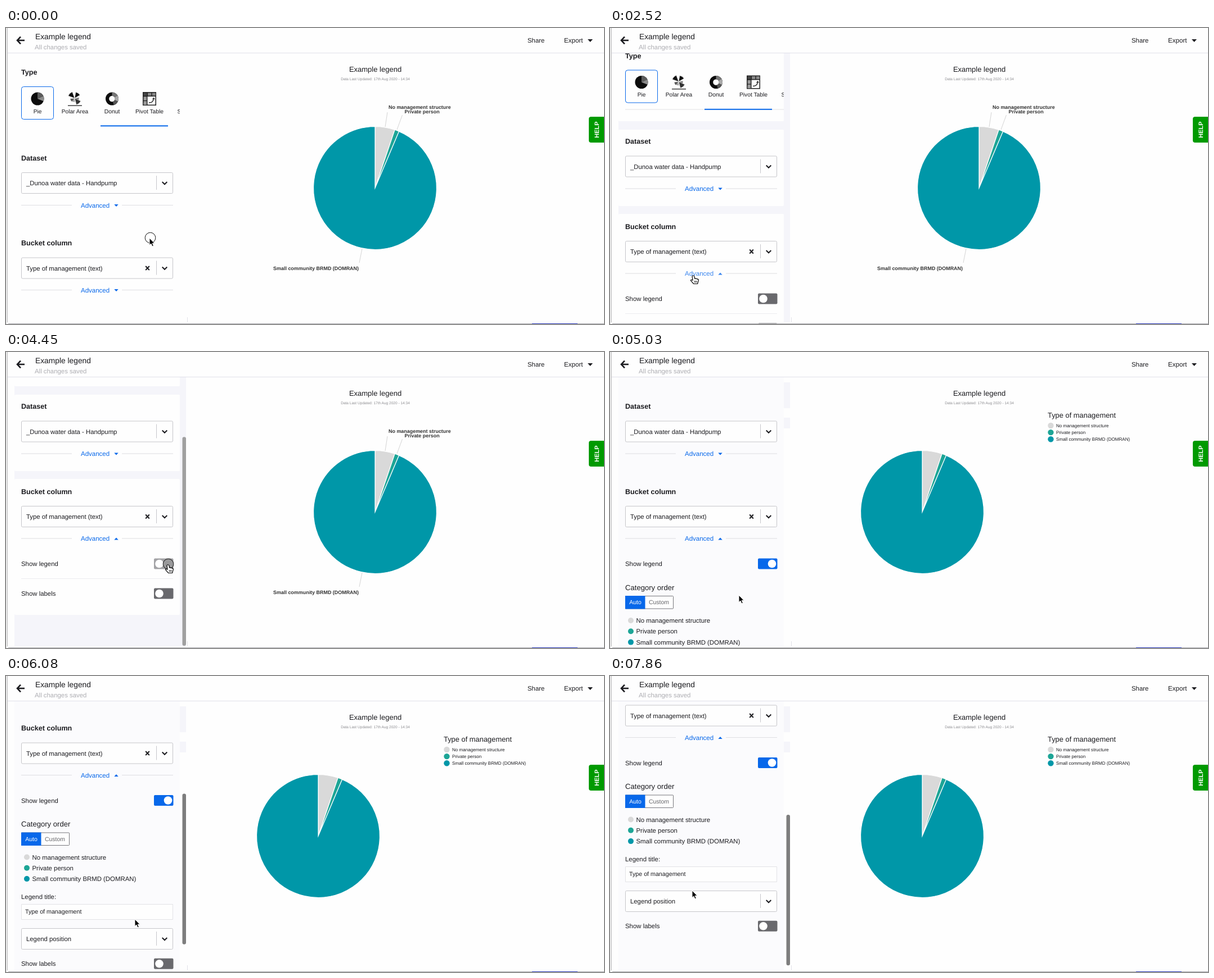
These frames come from a looping animation (1063x527 px, 8 s). An HTML page with a canvas:

```html
<!DOCTYPE html>
<html lang="en">
<head>
<meta charset="utf-8">
<title>Chart legend settings</title>
<style>
html, body { margin: 0; width: 100%; height: 100%; overflow: hidden; background: #fefefe; }
canvas { display: block; width: 1063px; height: 527px; }
</style>
</head>
<body>
<canvas id="stage" width="1063" height="527"></canvas>
<script>
const ctx = document.getElementById('stage').getContext('2d');
const LOOP = 8000;
const WHITE = '#fefefe', INK = '#1c1c20', BLUE = '#0868ea', GAP = '#f5f5fa';
const CATEGORIES = [
  ['No management structure', '#d9d9d9'],
  ['Private person', '#1da596'],
  ['Small community BRMD (DOMRAN)', '#0097a8']
];

// Moments when the state changes at once.
const RELEASE = 150, BAR_ON = 590, REPAINT = 1340, EXPAND = 2520, LEGEND = 4590, SAVED = 4890;

// Each segment: start, end, number of steps, from, to, ease-out power.
const SCROLL = [
  [590, 740, 2, [0], [29.5], 1.5],
  [2960, 3260, 3, [29.5], [134.5], 1.5],
  [5480, 6080, 5, [134.5], [290], 1.37],
  [6520, 7110, 5, [290], [357], 3.6]
];
const POINTER = [
  [1340, 2370, 8, [255, 374], [148, 441], 7],
  [3560, 4300, 6, [148, 441], [288, 379], 1.6],
  [4740, 5030, 3, [288, 379], [229, 433], 1.5],
  [6820, 7110, 3, [229, 433], [128, 308], 1.3],
  [7560, 7860, 3, [128, 308], [146, 382], 1.3]
];

function track(segs, t) {
  let value = segs[0][3];
  for (const [start, end, n, from, to, power] of segs) {
    if (t < start) break;
    const step = Math.floor((t - start + 8) / ((end - start) / (n - 1))) + 1;
    const k = 1 - Math.pow(1 - Math.min(step / n, 1), power);
    value = from.map((v, i) => v + (to[i] - v) * k);
  }
  return value;
}

const within = (t, a, b) => t >= a && t < b;

// y is the middle of the capitals
function text(str, x, y, size = 11.4, color = INK, align = 'left', weight = '') {
  ctx.font = `${weight} ${size}px "Liberation Sans", Arial, sans-serif`;
  ctx.textAlign = align;
  ctx.fillStyle = color;
  ctx.fillText(str, x, y + size * 0.36);
}

function rect(x, y, w, h, color) {
  ctx.fillStyle = color;
  ctx.fillRect(x, y, w, h);
}

function round(x, y, w, h, r, fill, stroke) {
  ctx.beginPath();
  ctx.roundRect(x, y, w, h, r);
  paint(fill, stroke, 1);
}

function paint(fill, stroke, width) {
  if (fill) { ctx.fillStyle = fill; ctx.fill(); }
  if (stroke) { ctx.strokeStyle = stroke; ctx.lineWidth = width; ctx.stroke(); }
}

function dot(x, y, r, fill, stroke, width = 1) {
  ctx.beginPath();
  ctx.arc(x, y, r, 0, 7);
  paint(fill, stroke, width);
}

function poly(points, x, y, fill, stroke, width = 1, closed = true) {
  ctx.beginPath();
  for (const [dx, dy] of points) ctx.lineTo(x + dx, y + dy);
  if (closed) ctx.closePath();
  paint(fill, stroke, width);
}

const line = (points, x, y, color, width) => poly(points, x, y, null, color, width, false);

// Angles in degrees, clockwise from the top.
function wedge(x, y, r, a, b, fill, stroke, width = 1) {
  const rad = d => (d - 90) * Math.PI / 180;
  ctx.beginPath();
  ctx.moveTo(x, y);
  ctx.arc(x, y, r, rad(a), rad(b));
  ctx.closePath();
  paint(fill, stroke, width);
}

function header(t) {
  rect(3, 0, 1060, 44, WHITE);
  rect(3, 44, 1060, 1, '#e0e0ea');
  line([[7, 0], [-5, 0]], 26, 22, INK, 2.6);
  line([[0, -6.3], [-6, 0], [0, 6.3]], 26, 22, INK, 2.6);
  const saving = within(t, LEGEND, SAVED);
  text('Example legend', 52, saving ? 22 : 15, 13.8);
  if (!saving) text('All changes saved', 51, 34, 11.4, '#adadb2');
  text('Share', 927, 22);
  text('Export', 992, 22, 11.6);
  poly([[-4.5, -2], [4.5, -2], [0, 3]], 1038.5, 22, INK);
}

function frameEdges() {
  rect(0, 0, 2, 527, '#ececec');
  rect(2, 0, 1, 524, '#bdbdc0');
  rect(322, 515, 1, 9, '#e2e2e8');
  rect(4, 526, 1059, 1, '#a8a8ac');
  rect(935, 526, 81, 1, '#2030b0');
}

function help() {
  round(1036, 158, 32, 46, 4, '#009a00');
  ctx.save();
  ctx.translate(1050, 181);
  ctx.rotate(-Math.PI / 2);
  text('HELP', 0, 0, 11, '#fff', 'center', 'bold');
  ctx.restore();
}

function chart(t) {
  const legend = t >= LEGEND;
  const x = legend ? 555 : 656, y = 285;
  text('Example legend', 656.5, 73, 13, INK, 'center');
  text('Data Last Updated: 17th Aug 2020 - 14:34', 656.5, 91, 6.55, '#8c8c90', 'center');
  const edges = [0, 18.7, 22.9, 360];
  CATEGORIES.forEach(([, color], i) => wedge(x, y, 109.5, edges[i], edges[i + 1], color, '#fff', 1.2));
  if (legend) {
    text('Type of management', 778, 112, 12.9);
    CATEGORIES.forEach(([name, color], i) => {
      dot(783.5, 131 + i * 12.1, 5.2, color);
      text(name, 793, 131 + i * 12.1, 8.1);
    });
    return;
  }
  line([[674, 176], [678, 150]], 0, 0, '#d4d4d4');
  line([[695, 181], [704.5, 155]], 0, 0, '#d4d4d4');
  line([[633, 393], [628, 418]], 0, 0, '#d4d4d4');
  const label = (i, px, py, align) => text(CATEGORIES[i][0], px, py, 8.95, '#333', align, 'bold');
  label(0, 680, 140.5);
  label(1, 708.5, 148.5);
  label(2, 627, 427.5, 'right');
}

function chartTypes(t) {
  ctx.save();
  ctx.beginPath();
  ctx.rect(15, 45, 294, 300);
  ctx.translate(0, 0);
  ctx.restore();

  round(27.5, 104.5, 57, 58, 4, null, BLUE);
  dot(56, 126, 11.5, '#0c0c0c');
  wedge(56, 126, 11.5, 0, 65, '#5c5c5c');
  wedge(56, 126, 11.5, 65, 112, '#8b8b8b');

  [[10, 11, '#111'], [80, 8, '#777'], [115, 12, '#333'], [175, 7, '#999'], [215, 8, '#555'], [290, 12, '#111']]
    .forEach(([a, r, c]) => wedge(122, 125, r, a, a + 50, c, '#fff', 0.6));
  rect(110, 137.5, 25, 1.3, '#222');

  dot(188.5, 126, 8.4, null, '#0c0c0c', 6.2);
  [[0, 60, '#777'], [60, 115, '#aaa'], [115, 165, '#555']].forEach(([a, b, c]) => {
    ctx.beginPath();
    ctx.arc(188.5, 126, 8.4, (a - 90) * Math.PI / 180, (b - 90) * Math.PI / 180);
    paint(null, c, 6.2);
  });

  rect(243, 114, 24, 24, '#222');
  for (let i = 0; i < 3; i++) {
    rect(244.5 + i * 7.6, 115.5, 6.2, 5, i ? '#888' : '#444');
    if (i) rect(244.5, 114.5 + i * 7.8, 5.5, 6.6, '#999');
  }
  rect(244.5, 133.5, 5.5, 3, '#999');
  rect(251.5, 122, 14, 14.5, '#fff');
  ctx.beginPath();
  ctx.moveTo(254, 133);
  ctx.quadraticCurveTo(262, 133, 262.5, 125.5);
  paint(null, '#222', 1.4);
  line([[-2, 2], [0, -0.5], [2, 2]], 262.5, 125, '#222', 1.2);

  text('Pie', 56, 148, 10.2, INK, 'center');
  text('Polar Area', 122.5, 148, 10.2, INK, 'center');
  text('Donut', 188.5, 148, 10.4, INK, 'center');
  text('Pivot Table', 255, 148, 10.3, INK, 'center');
  ctx.save();
  ctx.beginPath();
  ctx.rect(300, 100, 9, 80);
  ctx.clip();
  text('Scatter', 304.5, 148, 10.2);
  ctx.restore();
  if (t >= BAR_ON) rect(27, 174, 282, 1, '#e2e2e6');
  rect(168, 173.3, 120, 2, BLUE);
}

function select(label, y, clearable) {
  round(27.5, y - 18.5, 269, 37, 2, WHITE, '#c6c6ca');
  text(label, 36, y, 11.35);
  rect(267, y - 13, 1, 25, '#c6c6ca');
  line([[-4.3, -2], [0, 2.3], [4.3, -2]], 282, y, INK, 2);
  if (clearable) {
    line([[-3.3, -3.5], [3.3, 3.5]], 251.5, y, INK, 2);
    line([[3.3, -3.5], [-3.3, 3.5]], 251.5, y, INK, 2);
  }
}

function advanced(y, open, color = BLUE) {
  rect(27, y - 0.5, 90, 1, '#dedee2');
  rect(206, y - 0.5, 91, 1, '#dedee2');
  text('Advanced', 133, y, 11.5, color);
  const d = open ? -1 : 1;
  poly([[-3.7, -2 * d], [3.7, -2 * d], [0, 2 * d]], 196, y + 0.5, color);
}

function toggle(label, y, on, color) {
  text(label, 27, y);
  round(263, y - 9.5, 34.5, 19, 2, color || (on ? BLUE : '#69696d'));
  dot(on ? 288 : 272.5, y, 7.3, '#fff');
}

function legendOptions() {
  text('Category order', 27, 553.5, 13.1);
  round(27.5, 569, 85, 22.5, 1, WHITE, '#77777c');
  rect(27, 568.5, 35.5, 23.5, BLUE);
  text('Auto', 45, 580, 10.5, '#fff', 'center');
  text('Custom', 87, 580, 10.5, '#66666a', 'center');
  CATEGORIES.forEach(([name, color], i) => {
    dot(37, 612.5 + i * 19.3, 5, color);
    text(name, 46.5, 612.5 + i * 19.3);
  });
  text('Legend title:', 27, 682.5);
  round(27.5, 696.5, 269, 27, 0, WHITE, '#e2e2e6');
  text('Type of management', 34, 709.5, 10.7);
  select('Legend position', 758);
}

function backdrop(t, scroll) {
  if (t < REPAINT) return;
  if (t >= LEGEND) {
    rect(15, 45, 294, 479, '#fbfbfd');
    rect(309, 54, 11, 46, GAP);
    rect(309, 117, 11, 19, GAP);
    return;
  }
  rect(15, 45, 305, 479, GAP);
  const end = t >= EXPAND ? 602.5 : 497.5;
  for (const [top, bottom] of [[0, 195.5], [210.5, 346.5], [360.5, end]])
    round(15, top - scroll, 294, bottom - top, 2, WHITE);
}

function scrollbar(t, scroll) {
  if (!within(t, BAR_ON, 1490) && !within(t, 2960, LEGEND) && t < 5480) return;
  const height = t >= LEGEND ? 850 : t >= EXPAND ? 613.5 : 508.5;
  const color = t >= LEGEND ? '#7e7e7e' : t >= EXPAND ? '#a0a0a0' : '#b2b2b2';
  round(313.5, 47 + scroll * 476 / height, 6.5, 476 * 479 / height, 3.2, color);
}

function panel(t, scroll) {
  ctx.save();
  ctx.beginPath();
  ctx.rect(4, 45, 318, 481);
  ctx.clip();
  backdrop(t, scroll);
  ctx.translate(0, -scroll);
  const title = (str, y) => text(str, 27, y, 12.6, INK, 'left', 'bold');
  title('Type', 78.5);
  chartTypes(t);
  title('Dataset', 231);
  select('_Dunoa water data - Handpump', 276);
  advanced(315.5, false);
  title('Bucket column', 382.5);
  select('Type of management (text)', 427.5, true);
  const open = t >= EXPAND, legend = t >= LEGEND;
  advanced(466.5, open, within(t, 1930, 2960) ? '#3b86ee' : BLUE);
  if (open) {
    toggle('Show legend', 511.5, legend, within(t, 4440, LEGEND) && '#a3a3a6');
    if (legend) legendOptions();
    else rect(27, 537.5, 270, 1, '#ececf0');
    toggle('Show labels', legend ? 802.3 : 564.5, false);
  }
  ctx.translate(0, scroll);
  scrollbar(t, scroll);
  ctx.restore();
}

function hand(x, y) {
  ctx.beginPath();
  ctx.moveTo(x - 2, y + 1);
  ctx.quadraticCurveTo(x, y - 1.5, x + 1.8, y + 1);
  ctx.lineTo(x + 2.5, y + 5);
  ctx.quadraticCurveTo(x + 4, y + 3.8, x + 5, y + 5.6);
  ctx.quadraticCurveTo(x + 6.8, y + 4.6, x + 7.5, y + 6.4);
  ctx.quadraticCurveTo(x + 9.4, y + 5.6, x + 9.4, y + 8);
  ctx.lineTo(x + 7.6, y + 14.5);
  ctx.lineTo(x + 0.5, y + 14.5);
  ctx.lineTo(x - 4.5, y + 8.6);
  ctx.quadraticCurveTo(x - 4.5, y + 6.4, x - 1, y + 8);
  ctx.closePath();
  paint('#fff', '#000', 1.2);
  for (const dx of [2.3, 4.2, 6]) line([[dx, 9], [dx, 12.5]], x, y, '#000', 0.8);
}

function beam(x, y) {
  line([[-3, -6.5], [-1, -6.5], [0, -5.5], [0, 5.5], [-1, 6.5], [-3, 6.5]], x + 0.5, y, '#111', 1.2);
  line([[3, -6.5], [1, -6.5], [0, -5.5]], x + 0.5, y, '#111', 1.2);
  line([[3, 6.5], [1, 6.5], [0, 5.5]], x + 0.5, y, '#111', 1.2);
  line([[-1.5, 2], [1.5, 2]], x + 0.5, y, '#111', 1);
}

function arrow(x, y) {
  const shape = [[0, 0], [0, 12.6], [2.9, 10], [5, 14.8], [7.3, 13.8], [5.2, 9.2], [9, 9.2]];
  poly(shape, x, y, '#000', '#fff', 1);
}

function pointer(t) {
  const [x, y] = track(POINTER, t);
  if (t < RELEASE) dot(256.5, 373.5, 9.3, '#fff', '#111');
  if (within(t, 2362, EXPAND) || within(t, 4440, LEGEND))
    dot(x + 0.5, y - 1.5, 9.3, 'rgba(150,150,150,0.75)', '#111');
  if (within(t, 1930, 2960) || within(t, 4290, 4740)) hand(x, y);
  else if (within(t, 6520, 6815)) beam(x, y + 1);
  else arrow(x, y);
}

function draw(now) {
  const t = now % LOOP;
  const [scroll] = track(SCROLL, t);
  ctx.textRendering = 'geometricPrecision';
  rect(0, 0, 1063, 527, WHITE);
  chart(t);
  panel(t, scroll);
  header(t);
  frameEdges();
  help();
  pointer(t);
  requestAnimationFrame(draw);
}
requestAnimationFrame(draw);
</script>
</body>
</html>
```
